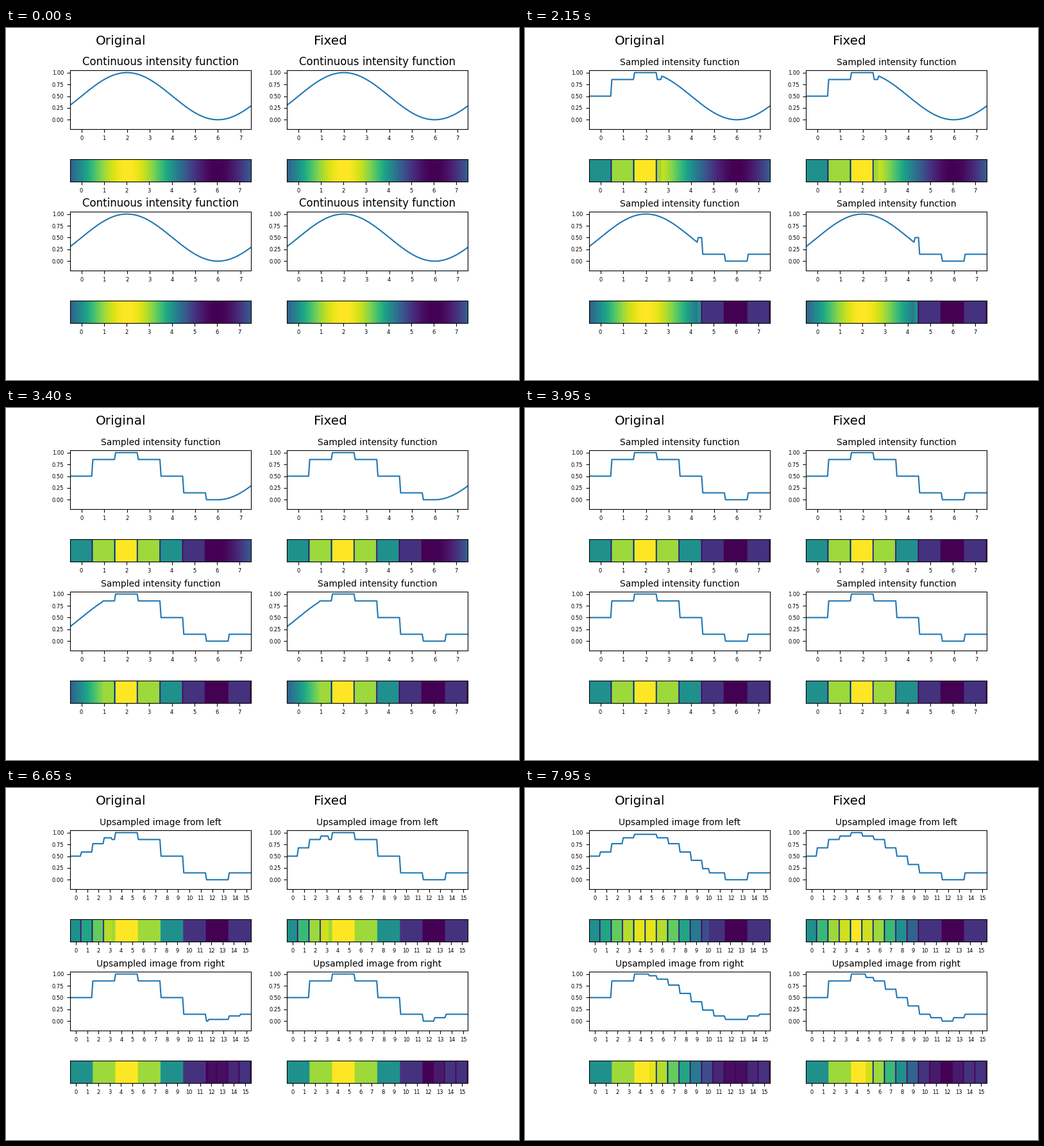
A matplotlib script that plays this animation: 800x550 px, repeating every 8 s.

```python
import numpy as np
import matplotlib.pyplot as plt
from matplotlib.animation import FuncAnimation

INTERVAL, FRAMES = 50, 160
SWEEP = 60            # steps in one full sweep
COLS = 160            # columns across each strip
SAMPLE_START, UPSAMPLE_START = 20, 120

plt.rcParams["font.family"] = "DejaVu Sans"


def wave(x):
    return 0.5 + 0.5 * np.sin(np.asarray(x) * np.pi / 4)


def spread(values):
    return np.repeat(values, COLS // len(values))


fine_x = -0.5 + np.arange(COLS) * 0.05
samples = wave(np.arange(8))
continuous, sampled = wave(fine_x), spread(samples)

# Left column: half-pixel centred resampling. Right column: aligned to sample 0.
half = np.arange(16) / 2
upsampled = [spread(np.interp(pos, np.arange(8), samples))
             for pos in (half - 0.25, half)]


def sweep(before, after, step, from_right, cell):
    """Replace columns of `before` with `after`; the strip also gets cell borders."""
    column = np.arange(COLS)
    if from_right:
        done = column >= COLS * (SWEEP - step) // SWEEP
    else:
        done = column < COLS * step // SWEEP
    curve = np.where(done, after, before)
    strip = np.where(done & (column % cell == cell - 1), 0, curve)
    return curve, strip


class Panel:
    """A curve with the matching colour strip below it."""

    def __init__(self, curve_ax, strip_ax, col, from_right):
        self.curve_ax, self.strip_ax = curve_ax, strip_ax
        self.col, self.from_right = col, from_right
        self.line, = curve_ax.plot(fine_x, continuous)
        self.image = strip_ax.imshow(continuous[None], vmin=0, vmax=1,
                                     extent=(-0.5, 7.5, 0, 1))
        curve_ax.set_ylim(-0.2, 1.05)
        curve_ax.set_yticks(np.linspace(0, 1, 5))
        strip_ax.set_yticks([])
        for ax in (curve_ax, strip_ax):
            ax.tick_params(labelsize=6)

    def scale(self, count):
        x = -0.5 + np.arange(COLS) * count / COLS
        self.line.set_xdata(x)
        self.curve_ax.set_xlim(x[0], x[-1])
        self.image.set_extent((-0.5, count - 0.5, 0, count / 8))
        for ax in (self.curve_ax, self.strip_ax):
            ax.set_xticks(range(count))

    def show(self, frame):
        if frame < SAMPLE_START:
            count, title, size = 8, "Continuous intensity function", 12
            curve = strip = continuous
        elif frame < UPSAMPLE_START:
            count, title, size = 8, "Sampled intensity function", 10
            step = min(frame - SAMPLE_START + 1, SWEEP)
            curve, strip = sweep(continuous, sampled, step, self.from_right, 20)
        else:
            side = "right" if self.from_right else "left"
            count, title, size = 16, f"Upsampled image from {side}", 10
            step = frame - UPSAMPLE_START + 1
            curve, strip = sweep(sampled, upsampled[self.col], step,
                                 self.from_right, 10)
        if frame in (0, UPSAMPLE_START) or len(self.curve_ax.get_xticks()) != count:
            self.scale(count)
        self.curve_ax.set_title(title, fontsize=size)
        self.line.set_ydata(curve)
        self.image.set_data(strip[None])


fig, axes = plt.subplots(4, 2, figsize=(8, 5.5), dpi=100)
fig.text(0.175, 0.953, "Original", fontsize=14.4)
fig.text(0.6, 0.953, "Fixed", fontsize=14.4)
panels = [Panel(axes[row, col], axes[row + 1, col], col, row == 2)
          for row in (0, 2) for col in (0, 1)]


def update(frame):
    for panel in panels:
        panel.show(frame)
    return []


anim = FuncAnimation(fig, update, frames=FRAMES, interval=INTERVAL,
                     init_func=lambda: update(0), repeat=True, repeat_delay=0)
plt.show()
```
